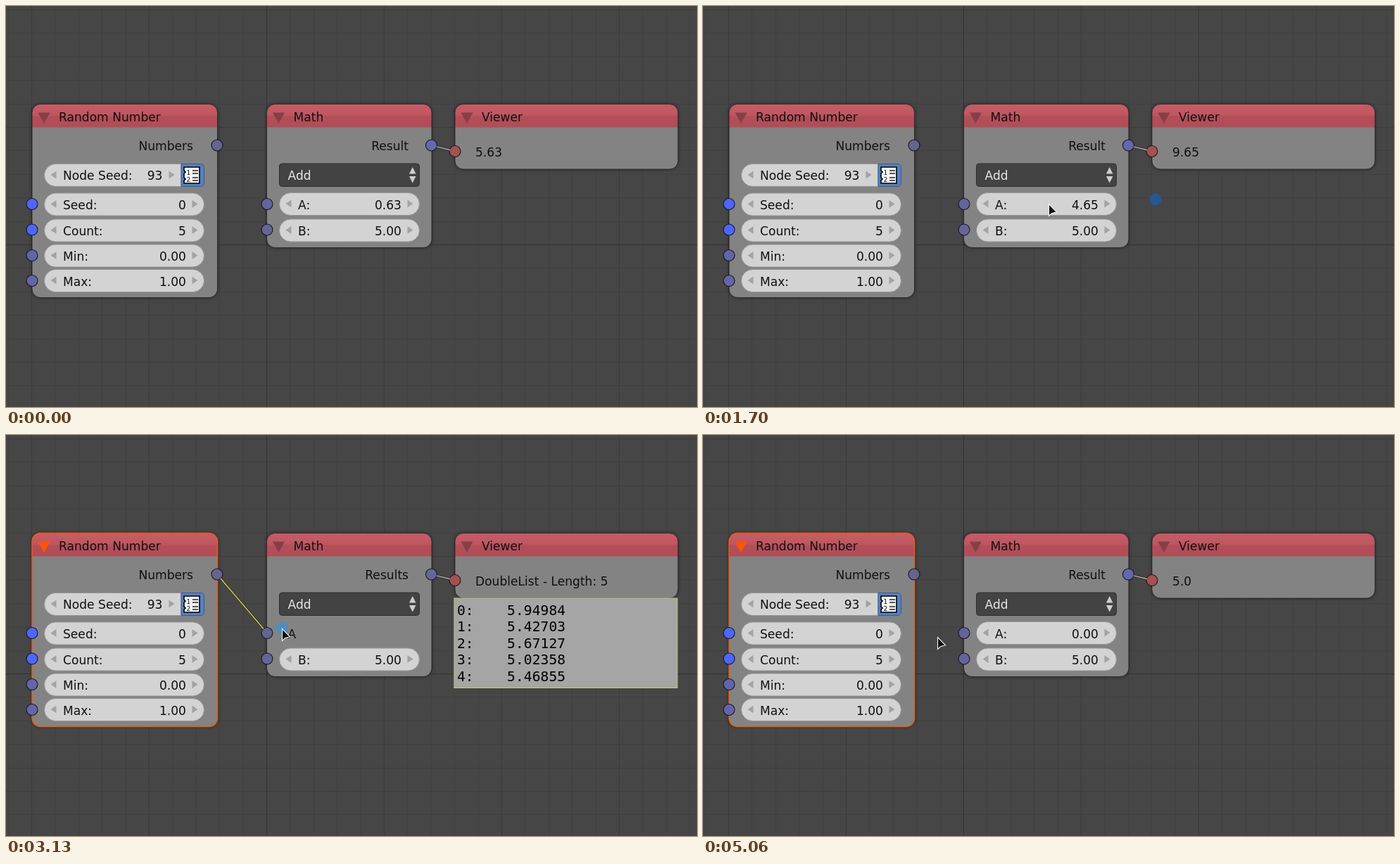
These frames come from a looping animation (982 px wide and 570 px high, 5.11 s). An HTML page:

```html
<!DOCTYPE html>
<html lang="en">
<head>
<meta charset="utf-8">
<title>Node editor</title>
<style>
html, body { margin: 0; width: 100%; height: 100%; overflow: hidden; background: #464646; }
svg { display: block; width: 982px; height: 570px; }
text { font: 17.1px "DejaVu Sans", sans-serif; fill: #111; white-space: pre; }
.mono { font: 19.7px "DejaVu Sans Mono", monospace; fill: #000; }
.end { text-anchor: end; }
.field { fill: #d3d3d3; stroke: #989898; }
.arrow { fill: #a3a3a3; }
.hover .field { fill: #e4e4e4; }
.press .field { fill: #5680c2; stroke: #9db4d6; }
.press text { fill: #fff; }
.press .arrow { fill: #72808f; }
.socket { stroke: #17171c; stroke-width: 1.1; }
.fold { fill: #853f48; }
.rim { fill: none; stroke: #1c1c1c; stroke-opacity: .75; }
.picked .rim { stroke: #f25a0c; stroke-opacity: 1; stroke-width: 1.5; }
.picked .fold { fill: #ff5500; }
</style>
</head>
<body>
<svg id="stage" viewBox="0 0 982 570" xmlns="http://www.w3.org/2000/svg"></svg>
<script>
const LOOP = 5110;
const stage = document.getElementById('stage');

// Static parts
const label = (x, y, s, attrs = '') => `<text x="${x}" y="${y}" ${attrs}>${s}</text>`;
const socket = (x, y, fill, id = '') =>
  `<circle class="socket" ${id && `id="${id}"`} cx="${x}" cy="${y}" r="8" fill="${fill}"/>`;

function grid() {
  const step = 33.4;
  let out = '';
  for (const level of [1, 5, 25]) {
    const color = { 1: '#404040', 5: '#3a3a3a', 25: '#323232' }[level];
    let d = '';
    for (let i = -11; i < 19; i++) {
      if (i % level) continue;
      d += `M${Math.round(370 + i * step) + .5} 0V570`;
      d += `M0 ${Math.round(339 + i * step) + .5}H982`;
    }
    out += `<path d="${d}" stroke="${color}"/>`;
  }
  return out;
}

function node(id, x, right, bottom, title, titleX, inner) {
  const top = 139.5, w = right - x, h = bottom - top;
  const box = `x="${x}" y="${top}" width="${w}" height="${h}" rx="12"`;
  return `<g id="${id}">
    <rect ${box} fill="#000" opacity=".5" filter="url(#soft)"/>
    <rect ${box} fill="#838383"/>
    <path d="M${x} 172.5V151.5a12 12 0 0 1 12-12H${right - 12}a12 12 0 0 1 12 12V172.5z" fill="url(#head)"/>
    <rect class="rim" ${box}/>
    <path class="fold" d="M${x + 8.5} 151.5h17l-8.5 15.5z"/>
    ${label(titleX, 163.5, title)}${inner}</g>`;
}

const arrows = (x, right, y) =>
  `<path class="arrow" d="M${x + 17} ${y - 5.5}v11l-8-5.5zM${right - 17} ${y - 5.5}v11l8-5.5z"/>`;

function field(id, x, right, top, name, value) {
  return `<g id="${id}">
    <rect class="field" x="${x}" y="${top}" width="${right - x}" height="32" rx="16"/>
    ${arrows(x, right, top + 15.5)}
    ${label(x + 26.5, top + 23, name)}
    ${label(right - 25.5, top + 23, value, 'class="end"')}</g>`;
}

const seedField = `
  <path class="field" d="M249 224.5H70.5a16 16 0 0 0 0 32H249z"/>
  ${arrows(54.5, 248.5, 240)}
  ${label(81, 247, 'Node Seed:')}${label(222.5, 247, '93', 'class="end"')}
  <path d="M249 224.5h28a4.5 4.5 0 0 1 4.5 4.5v23a4.5 4.5 0 0 1-4.5 4.5h-28z" fill="#5680c2" stroke="#3d5a88"/>
  <path d="M253 229h22v23h-22v-4l2-2-2-2v-6l2-2-2-2z" fill="#f4f4f4" stroke="#000" stroke-width="1.6"/>
  <path d="M265 234h8M265 238h8M265 244h8M265 248h8" stroke="#222" stroke-width="1.5"/>
  <g font-weight="bold">${label(256.5, 239.5, '1', 'style="font-size:9px"')}
  ${label(256.5, 250, '2', 'style="font-size:9px"')}</g>`;

const randomNode = node('random', 37, 300.5, 414.5, 'Random Number', 75,
  label(266, 205, 'Numbers', 'class="end"') + seedField +
  field('seed', 54.5, 281.5, 266, 'Seed:', '0') +
  field('count', 54.5, 281.5, 303, 'Count:', '5') +
  field('min', 54.5, 281.5, 339, 'Min:', '0.00') +
  field('max', 54.5, 281.5, 374.5, 'Max:', '1.00') +
  socket(300, 198, '#64648e') +
  socket(37, 281.5, '#4c66ff') + socket(37, 318, '#4c66ff') +
  socket(37, 354.5, '#6464aa') + socket(37, 390.5, '#6464aa'));

const mathNode = node('math', 370.5, 605, 343.5, 'Math', 408.5,
  label(572, 205, '', 'class="end" id="result"') + `
  <rect x="388.5" y="224" width="199" height="32.5" rx="4" fill="#434343" stroke="#2e2e2e"/>
  <path d="M573 238.5h9.5l-4.75-9.5zM573 242h9.5l-4.75 9.5z" fill="#cfcfcf"/>` +
  label(400.5, 247, 'Add', 'style="fill:#e6e6e6"') +
  field('fieldA', 388.5, 587.5, 265.5, 'A:', '') +
  label(400.5, 288.5, 'A', 'id="plainA"') +
  field('fieldB', 388.5, 587.5, 303, 'B:', '5.00') +
  socket(604.5, 198, '#6666b2', 'outSocket') +
  socket(371, 281.5, '#64649a', 'inSocket') + socket(371, 318, '#64649a'));

const numbers = [5.94984, 5.42703, 5.67127, 5.02358, 5.46855];
const list = `<g id="list">
  <rect x="637" y="232" width="317" height="127.5" fill="#a5a5a5" stroke="#c3cc7a"/>
  ${numbers.map((n, i) => label(641, 255.5 + i * 23.6, `${i}:    ${n}`, 'class="mono"')).join('')}</g>`;

const viewerNode = node('viewer', 638, 955, 232, 'Viewer', 676,
  label(667, 214, '', 'id="shown"') + socket(638, 206.5, '#a65050'));

const line = (id, color) => `<g id="${id}" fill="none">
  <path stroke="#222" stroke-opacity=".45" stroke-width="3"/>
  <path stroke="${color}" stroke-width="1.2"/></g>`;

stage.innerHTML = `
  <defs>
    <linearGradient id="head" x1="0" y1="0" x2="0" y2="1">
      <stop offset="0" stop-color="#c65c66"/><stop offset=".46" stop-color="#be5761"/>
      <stop offset=".54" stop-color="#b44e59"/><stop offset="1" stop-color="#b04d57"/>
    </linearGradient>
    <filter id="soft" x="-10%" y="-10%" width="120%" height="120%"><feGaussianBlur stdDeviation="2.5"/></filter>
  </defs>
  <rect width="982" height="570" fill="#464646"/>
  ${grid()}${randomNode}${mathNode}${viewerNode}${list}
  ${line('wire', '#c4c4c4')}${line('link', '#e3e04a')}
  <path id="cut" fill="none" stroke="#f0f0f0" stroke-width="1.1" stroke-dasharray="2 1"/>
  <circle id="dot"/>
  <path id="pointer" d="M.5 .5V17.5L4.5 13.8L11.5 11.8z" fill="#111" stroke="#f4f4f4" stroke-width="1.1"/>
  <g id="knife" stroke-linejoin="round">
    <path d="M0 1L3-6L8-10L11-7L7-2z" fill="#fff" stroke="#111" stroke-width="1.3"/>
    <path d="M8-10L13-15L15-13L11-7z" fill="#222" stroke="#111"/>
    <path d="M10-9L13.5-13" stroke="#ddd"/>
  </g>`;

// Motion helpers
const el = id => document.getElementById(id);
const show = (id, on) => el(id).setAttribute('visibility', on ? 'visible' : 'hidden');
const setText = (node, s) => { if (node.textContent !== s) node.textContent = s; };
const setLine = (id, a, b) => el(id).querySelectorAll('path')
  .forEach(p => p.setAttribute('d', `M${a}L${b}`));
const clamp = x => Math.max(0, Math.min(1, x));
const smooth = x => x * x * (3 - 2 * x);
const mix = (a, b, p) => a.map((v, i) => v + (b[i] - v) * p);

// Index of the held picture, from -1 before the start to n - 1
function held(t, start, end, n) {
  if (t < start) return -1;
  return Math.min(n - 1, Math.floor((t - start) / (end - start) * (n - 1) + .25));
}

function curve(points, p) {
  while (points.length > 1) points = points.slice(1).map((b, i) => mix(points[i], b, p));
  return points[0];
}

const FIELD = [491, 281], OUT = [301, 195.5], IN = [392, 275], CUT = [361, 186], END = [333, 287];
const cutAt = p => curve([CUT, [346, 240], END], p);

function mouse(t) {
  if (t < 2390) {
    const k = Math.max(0, held(t, 1700, 2200, 12));
    return curve([FIELD, [380, 280], [192, 215], OUT], smooth(k / 11));
  }
  if (t < 3870) return mix(OUT, IN, smooth(held(t, 2390, 2690, 8) / 7));
  if (t < 4440) return mix(IN, CUT, smooth(clamp((held(t, 3870, 4390, 13) + 1) / 12)));
  return cutAt((held(t, 4440, 4680, 7) + 1) / 7);
}

function drawDot(t, [mx, my]) {
  const dot = el('dot');
  const pressed = (t >= 2240 && t < 3080) || (t >= 4390 && t < 4820);
  let x = mx, y = my + 1.5, r = 7, alpha = .75, color = '#2470b8';
  // Each release grows and fades
  const releases = [[1700, 290, [643, 275], '#1f5b9c'], [3080, 290, IN, '#3a92d2'], [4820, 240, END, '#2470b8']];
  const last = releases.find(([at, len]) => t >= at && t < at + len);
  if (last) {
    const [at, len, spot, tint] = last;
    const p = held(t, at, at + len, len > 250 ? 7 : 6) / 6;
    [x, y] = spot;
    r = 8.5 + 4.5 * p;
    alpha = .88 * (1 - p) ** 1.6;
    color = tint;
  }
  const attrs = { cx: x, cy: y, r, fill: color, 'fill-opacity': alpha };
  for (const k in attrs) dot.setAttribute(k, attrs[k]);
  show('dot', pressed || last);
}

function draw(t) {
  const linked = t >= 3080 && t < 4820;
  const cutting = t >= 4390 && t < 4820;
  const at = mouse(t);

  // Field A: hover, drag, then reset once the link is cut
  const p = (held(t, 690, 1400, 18) + 1) / 18;
  const a = t >= 4820 ? 0 : .63 + 4.02 * (.73 * p + .27 * smooth(p));
  const state = t >= 460 && t < 1700 ? 'press' : t >= 170 && t < 460 ? 'hover' : '';
  el('fieldA').setAttribute('class', state);
  el('fieldB').setAttribute('class', t >= 90 && t < 130 ? 'hover' : '');
  setText(el('fieldA').querySelector('.end'), a.toFixed(2));
  show('fieldA', !linked);
  show('plainA', linked);

  setText(el('result'), linked ? 'Results' : 'Result');
  setText(el('shown'), linked ? 'DoubleList - Length: 5' : t >= 4820 ? '5.0' : (a + 5).toFixed(2));
  show('list', linked);
  el('outSocket').setAttribute('fill', linked ? '#66669a' : '#6666b2');
  el('inSocket').setAttribute('fill', linked ? '#64648e' : '#64649a');
  el('random').setAttribute('class', t >= 2390 ? 'picked' : '');

  show('link', t >= 2425 && t < 4820);
  setLine('link', [305, 204], linked ? [366, 275.5] : at);

  show('cut', t >= 4440 && t < 4820);
  const n = held(t, 4440, 4680, 7) + 1;
  const trail = Array.from({ length: n + 1 }, (_, i) => cutAt(i / 7).map(v => v.toFixed(1)));
  el('cut').setAttribute('d', 'M' + trail.join('L'));

  drawDot(t, at);
  show('pointer', t >= 1700 && !cutting);
  show('knife', cutting);
  for (const id of ['pointer', 'knife']) el(id).setAttribute('transform', `translate(${at})`);
}

setLine('wire', [612, 200], [631, 204.7]);
const begin = performance.now();
function tick() {
  draw((performance.now() - begin) % LOOP);
  requestAnimationFrame(tick);
}
tick();
</script>
</body>
</html>
```
